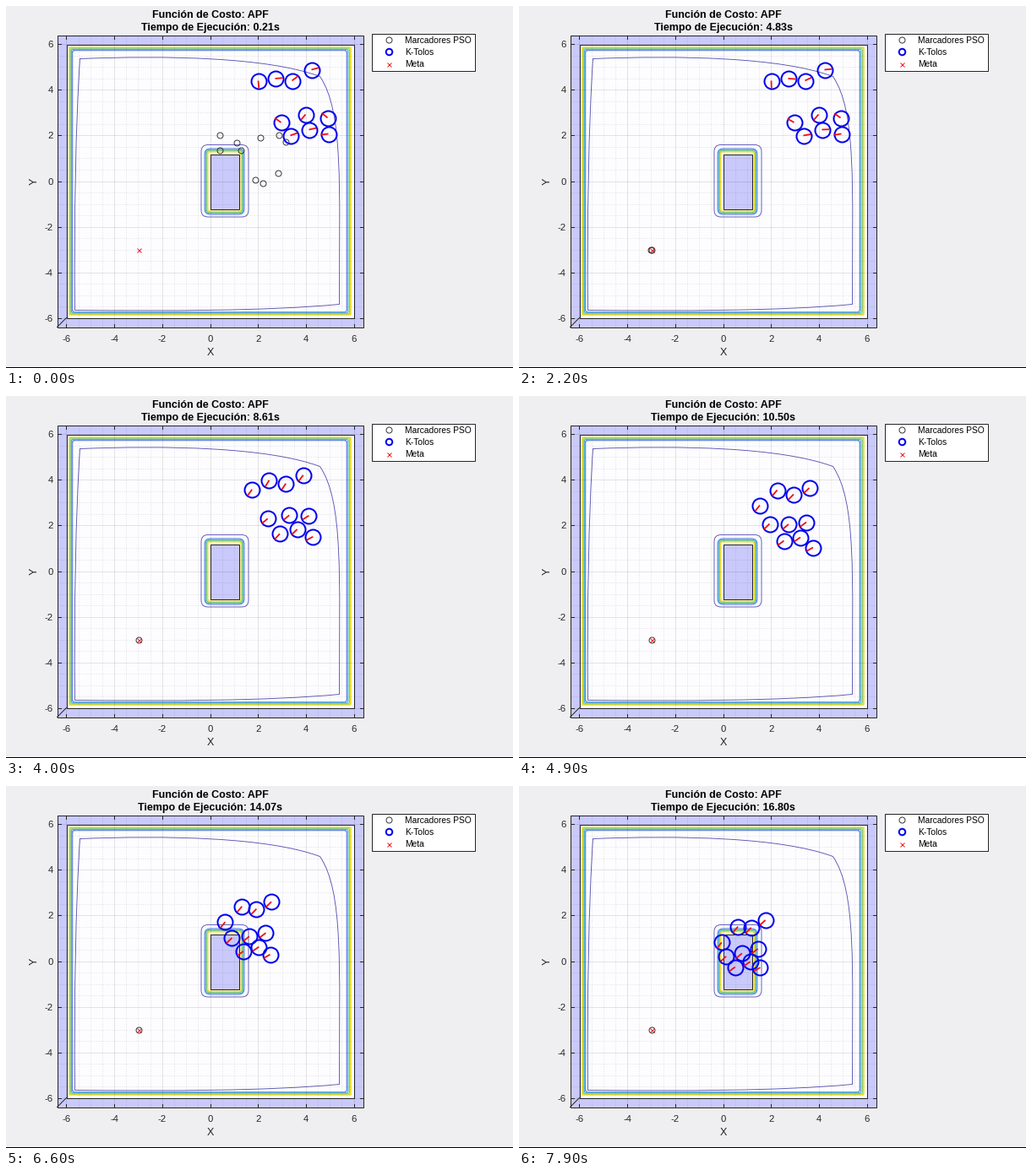
Animation of 600 by 429 pixels, one loop 8 s. Source, as a matplotlib script:

```python
import numpy as np
import matplotlib.pyplot as plt
from matplotlib.animation import FuncAnimation
from matplotlib.collections import LineCollection
from matplotlib.patches import FancyBboxPatch, PathPatch, Rectangle
from matplotlib.path import Path

W, H, DPI = 600, 429, 128
FRAMES, STEP = 80, 100
PT = 72 / DPI
BG, WALL, INK = "#efeef0", "#c9c9fb", "#262626"
INDIGO, BLUE, RED = "#5a52b4", "#0000ee", "#ee1c24"
LEVELS = [("#f0df30", 1.9), ("#8cc968", 1.1), ("#35b5c4", 1.1), ("#4a78ee", 1.0)]

plt.rcParams["font.family"] = "Liberation Sans"
fig = plt.figure(figsize=(W / DPI, H / DPI), dpi=DPI, facecolor=BG)
ax = fig.add_axes([0, 0, 1, 1])
ax.set(xlim=(0.5, W + 0.5), ylim=(H + 0.5, 0.5))
ax.axis("off")


def px(x):
    return 242 + 28.35 * x


def py(y):
    return 208 - 27.05 * y


def line(xs, ys, color=INK, lw=1.0, **kw):
    return ax.plot(xs, ys, color=color, lw=lw * PT, **kw)[0]


def box(x0, y0, x1, y1, face="none", edge="none", lw=1.0):
    ax.add_patch(Rectangle((x0, y0), x1 - x0, y1 - y0, fc=face, ec=edge, lw=lw * PT))


def round_box(x0, y0, x1, y1, r, color, lw):
    style = f"round,pad=0,rounding_size={r}"
    ax.add_patch(FancyBboxPatch((x0, y0), x1 - x0, y1 - y0, boxstyle=style,
                                fc="none", ec=color, lw=lw * PT))


def text(x, y, s, size, ha="center", **kw):
    kw.setdefault("va", "baseline")
    kw.setdefault("color", INK)
    return ax.text(x, y, s, size=size * PT, ha=ha, **kw)


def dots(x, y, color, size, lw, marker="o", z=5):
    return ax.plot(x, y, marker, mfc="none", mec=color, ms=size * PT,
                   mew=lw * PT, zorder=z)[0]


# Arena, obstacle and grid
box(61, 35, 423, 381, WALL)
box(72, 46, 412, 370, "#fdfdff")
box(242, 176, 276, 241, WALL)
for v in np.arange(-6, 6.1, 0.5):
    major = v % 2 == 0
    style = dict(color="black", alpha=0.10 if major else 0.12,
                 lw=1.0 if major else 0.8, ls="-" if major else (0, (1.5, 2)))
    line([px(v)] * 2, [35, 381], **style)
    line([61, 423], [py(v)] * 2, **style)
box(72, 46, 412, 370, edge=INK)
box(242, 176, 276, 241, edge=INK)
box(61, 35, 423, 381, edge=INK)
line([61, 72], [381, 370])

# Cost contours
for i, (color, lw) in enumerate(LEVELS):
    d = 3.6 + 1.1 * i
    round_box(72 + d, 46 + d, 412 - d - 0.4 * i, 370 - d, 1 + i / 2, color, lw)
    d = 3.0 + 1.15 * i
    round_box(242 - d, 176 - d, 276 + d, 241 + d, d, color, lw)
round_box(79.5, 53.5, 403.5, 363, 3, "#8d9df0", 0.7)
round_box(231.5, 165, 287.5, 250.5, 8, INDIGO, 0.9)
edge = [(88, 63), (190, 59), (310, 61), (372, 84), (400, 125), (395, 215),
        (395, 354), (310, 362), (190, 362), (82, 361), (81, 250), (83, 140), (88, 63)]
ax.add_patch(PathPatch(Path(edge, [Path.MOVETO] + [Path.CURVE4] * 12),
                       fc="none", ec=INDIGO, lw=0.9 * PT))

# Ticks and labels
for v in range(-6, 7, 2):
    for y, dy in [(381, -4), (35, 4)]:
        line([px(v)] * 2, [y, y + dy])
    for x, dx in [(61, 4), (423, -4)]:
        line([x, x + dx], [py(v)] * 2)
    text(px(v), 398, str(v), 11.3)
    text(56, py(v) + 4, str(v), 11.3, ha="right")
text(242, 415, "X", 12.5)
text(34, 208, "Y", 12.5, va="center", rotation=90)
text(242, 14.7, "Función de Costo: APF", 12.45, weight="bold", color="black")
clock = text(242, 30, "", 12.45, weight="bold", color="black")
box(0, H - 0.5, W + 1, H + 1, "black")

# Legend
box(433, 33, 555, 77, "white", INK)
entries = [("Marcadores PSO", INK, 7, 0.9, "o"), ("K-Tolos", BLUE, 7.5, 2, "o"),
           ("Meta", RED, 5, 1, "x")]
for i, (name, *mark) in enumerate(entries):
    y = 40.5 + 14.3 * i
    text(473, y + 3.8, name, 10.3, ha="left", color="black")
    dots(453, y, *mark)

GOAL = np.array([157, 289])

# Robots: first formation, the formation that sets off for the goal, headings
FIRST = np.array([(299, 89), (319, 86.5), (339, 89), (362, 76), (326, 138.5),
                  (355, 129), (381, 133), (337, 154), (359, 147), (382, 152)])
GATHER = np.array([(285.5, 130), (306, 112), (325.5, 117), (344, 109.5), (297, 152),
                   (319.5, 152.5), (340.5, 150), (314, 172), (333.5, 168), (348.5, 180)])
TURN = np.radians([-85, 5, 37, 15, 145, 230, 140, 20, 12, 187])
WANDER, LEAVE = 2.0, 4.9
SPEED = 24


def unit(angle):
    return np.column_stack([np.cos(angle), -np.sin(angle)])


def bearing(v):
    return np.arctan2(-v[:, 1], v[:, 0])


def phase(t, start, end):
    return min(max((t - start) / (end - start), 0), 1)


COURSE = bearing(GOAL - GATHER)
SWING = (COURSE - TURN + np.pi) % (2 * np.pi) - np.pi
AWAY = bearing(FIRST - GOAL) - TURN


def robots(t):
    """Back off from the goal and return, gather, then drive straight at it."""
    bump = np.sin(np.pi * phase(t, 0, WANDER)) ** 2
    turn = phase(t, 1.8, 4.4)
    angle = TURN + 0.55 * bump * np.sin(AWAY) + SWING * turn * turn * (3 - 2 * turn)
    place = FIRST + (GATHER - FIRST) * phase(t, 2.2, LEAVE) ** 1.5
    place = place + 5.5 * bump * np.cos(AWAY)[:, None] * unit(TURN)
    return place + SPEED * max(t - LEAVE, 0) * unit(COURSE), angle


# Swarm markers fall onto the goal, one overshoots, then the spread dies out
START = np.array([(253, 153), (273, 162), (301, 156), (323, 153), (331, 161),
                  (253, 171), (278, 171), (295, 206), (304.5, 210), (322.5, 197.5)])
SPREAD = np.random.default_rng(4).normal(0, (2, 4), START.shape)
SPREAD[0] = -56, -2
ARRIVE = 0.9


def swarm(t):
    s = phase(t, 0, ARRIVE)
    left = s * np.exp(-max(t - ARRIVE, 0) / 0.35)
    spots = GOAL + (START - GOAL) * (1 - s) ** 2 + SPREAD * left
    return np.unique(np.round(spots), axis=0)


markers = dots([], [], INK, 7, 0.9, z=4)
dots(*GOAL + [0, 0.5], RED, 5, 1, "x")
bodies = dots([], [], BLUE, 18, 2, z=6)
needles = LineCollection([], colors="#f01010", linewidths=1.8 * PT, zorder=7)
ax.add_collection(needles)


def draw(n):
    t = n * STEP / 1000
    clock.set_text(f"Tiempo de Ejecución: {0.21 * (n + 1):.2f}s")
    markers.set_data(*swarm(t).T)
    place, angle = robots(t)
    bodies.set_data(*place.T)
    needles.set_segments(np.stack([place, place + 9 * unit(angle)], axis=1))
    return clock, markers, bodies, needles


anim = FuncAnimation(fig, draw, frames=FRAMES, interval=STEP, repeat=True,
                     repeat_delay=0, blit=False)
plt.show()
```
